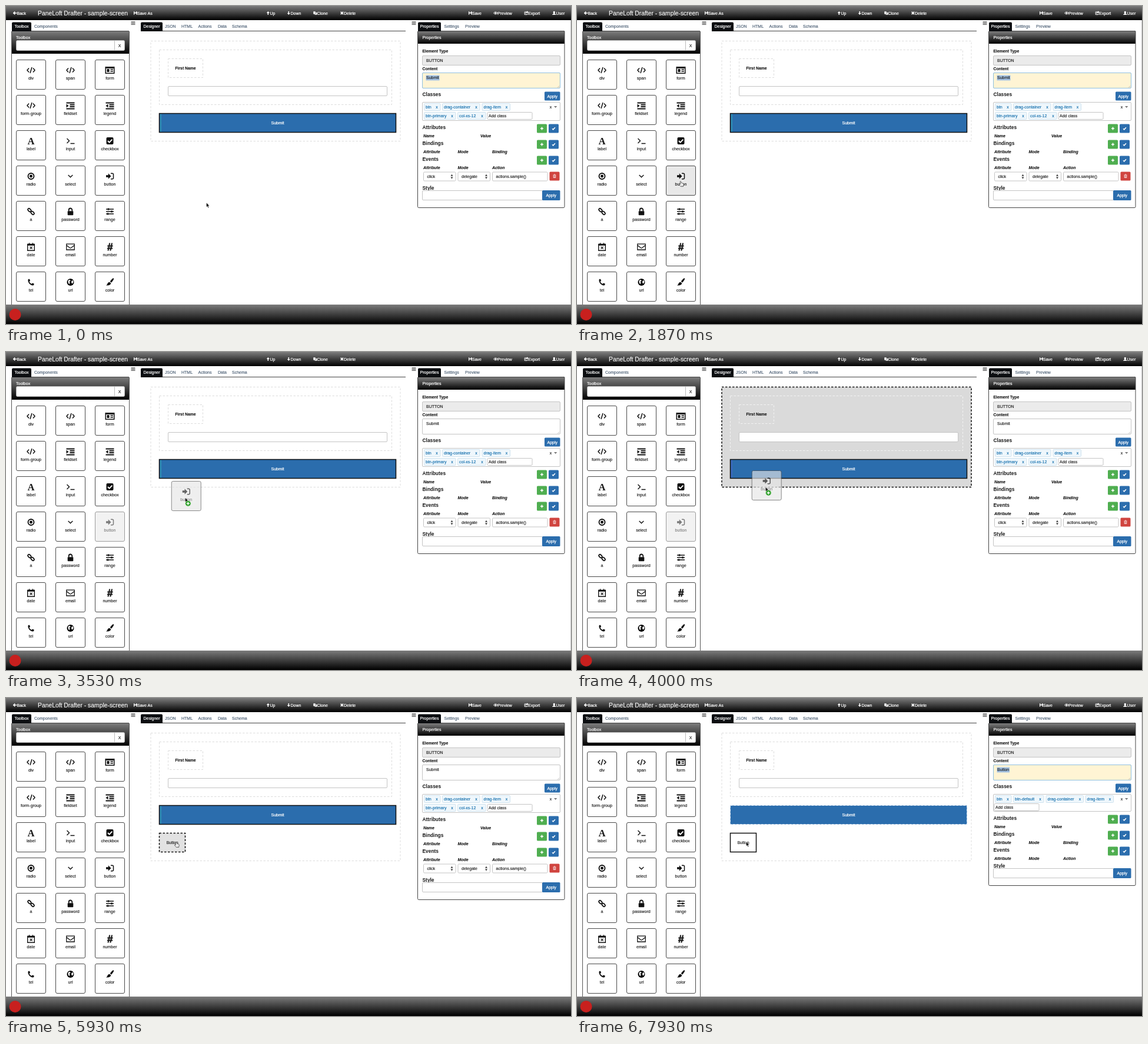
Recreate the animation shown at these times as an HTML page. Size 960 by 540 pixels, loop 8000 ms.

```html
<!DOCTYPE html>
<html lang="en">
<head>
<meta charset="utf-8">
<title>Screen designer</title>
<style>
html, body { margin: 0; width: 100%; height: 100%; overflow: hidden; background: #fff; }
svg { display: block; width: 100vw; height: 100vh; }
text {
  font: 7px "Liberation Sans", Arial, sans-serif; white-space: pre;
  color: #1a1a1a; fill: currentColor; stroke: currentColor; stroke-width: .14;
}
.mid { text-anchor: middle; }
.label { font-size: 7.15px; }
.white { color: #fff; }
.bar { color: #fff; stroke-width: .22; }
.title { font-size: 10.35px; color: #fff; }
.link { color: #465a70; }
.bold { font-weight: bold; font-size: 6.8px; }
.head { font-weight: bold; font-size: 8.4px; stroke-width: 0; }
.col { font-weight: bold; font-style: italic; font-size: 6.9px; }
.tag { color: #0f6cab; }
.glyph { font: bold 16px "Liberation Serif", serif; }
.hash { font: italic bold 17px "Liberation Sans", sans-serif; stroke-width: .8; }
.faint { fill: none; stroke: #ddd; stroke-dasharray: 3.5 2.5; }
</style>
</head>
<body>
<svg id="stage" viewBox="0 0 960 540" preserveAspectRatio="none"></svg>
<script>
const BLUE = '#2b6dad', GREEN = '#4fae50', RED = '#d0443f', DASH = '3.5 2.5';

const text = (x, y, s, cls = '') => `<text x="${x}" y="${y}" class="${cls}">${s}</text>`;
const rect = (x, y, w, h, fill = '#fff', stroke = 'none', r = 0, more = '') =>
  `<rect x="${x}" y="${y}" width="${w}" height="${h}" rx="${r}" fill="${fill}" stroke="${stroke}" ${more}/>`;
const fill = (d, c = '#111') => `<path d="${d}" fill="${c}" fill-rule="evenodd"/>`;
const line = (d, c = '#111', w = 1.6) => `<path d="${d}" fill="none" stroke="${c}" stroke-width="${w}"/>`;
const at = (x, y, body, more = '') => `<g transform="translate(${x} ${y})" ${more}>${body}</g>`;
const group = (id, body) => `<g id="${id}">${body}</g>`;
const field = (x, y, w, h, c = '#fff') => rect(x, y, w, h, c, '#c4c4c4', 1.5);

const listBars = 'M-7-5.5h14v2h-14zM-1-2.2h8v2h-8zM-1 1.1h8v2h-8zM-7 4.4h14v2h-14z';
const code = line('M-3.5-3.5L-6.5 0l3 3.5M3.5-3.5L6.5 0l-3 3.5M1.5-5L-1.5 5', '#111', 1.5);
const icons = {
  div: code,
  span: code,
  form: fill('M-8-6H8V6H-8zM-6.5-3h13v7.5h-13zM-5-2h4v5h-4zM1-2h4.5v1.5H1zM1 1h4.5v1.5H1z'),
  'form-group': code,
  fieldset: fill(listBars + 'M-7-2.4l4 2.9-4 2.9z'),
  legend: fill(listBars + 'M-3-2.4l-4 2.9 4 2.9z'),
  label: text(0, 6, 'A', 'glyph mid'),
  input: line('M-6-4l4 4-4 4M0 4.5h7', '#111', 1.4),
  checkbox: rect(-6, -6, 12, 12, '#111', 'none', 2) + line('M-3.5 0l2.6 2.6L3.8-2.4', '#fff', 2),
  radio: '<circle r="5" fill="none" stroke="#111" stroke-width="1.9"/><circle r="2.4"/>',
  select: line('M-3.8-2l3.8 3.8L3.8-2', '#111', 1.4),
  button: line('M1.5-4.8h2.5q2 0 2 2v5.6q0 2-2 2h-2.5', '#111', 1.5) +
    fill('M-6.5-1.8h3.8v-3L2 0l-4.7 4.8v-3h-3.8z'),
  a: ['-2.6 -2.4', '2.6 2.4'].map(p => `<rect x="-3.2" y="-2" width="6.4" height="4" rx="2"
    transform="translate(${p}) rotate(45)" fill="none" stroke="#111" stroke-width="1.8"/>`).join(''),
  password: rect(-4.8, -.8, 9.6, 7, '#111', 'none', 1) + line('M-2.8-.5v-2.2a2.8 2.8 0 0 1 5.6 0v2.2', '#111', 1.8),
  range: line('M-6.5-4h13M-6.5 0h13M-6.5 4h13', '#111', 1.3) +
    line('M-2.5-5.6v3.2M3-1.6v3.2M-3.5 2.4v3.2', '#111', 2.6),
  date: line('M-5.8-4.5H5.8V6.3H-5.8zM-5.8-3H5.8M-3-6.8v3M3-6.8v3', '#111', 1.4) +
    line('M-1.9-.4l4 4m0-4l-4 4', '#111', 1.2),
  email: line('M-6.7-4.8H6.7V5H-6.7zM-6.5-2.5L-1 1.8q1 .7 2 0L6.5-2.5', '#111', 1.3),
  number: text(0, 6, '#', 'hash mid'),
  tel: fill('M-5-4.5q1.5-1.6 2.6-.6l1 2.6-1.6 1.4q1 2.6 3.8 4l1.6-1.5 2.7 1.2q.6 1.7-1.2 2.8C-.5 6.5-6 .5-5-4.5z'),
  url: '<circle r="6"/>' + fill('M-4-3l3-1.2 1.2 1.5-2 1.7L-1 .8l-1 3L-3.8 1zM2-2.5l2.5-.5.5 3-2 2.8L1.5.5z', '#fff'),
  color: fill('M6.5-6.5q1.4 1-4 7.3l-2.3-2Q5-7.5 6.5-6.5zM-.6-.3L1.8 1.8Q1 6.2-6.5 5.4q2-.9 2.3-3 1-2.7 3.6-2.7z')
};

const mark = {
  back: line('M3 0H-2.4M0-2.6L-2.6 0 0 2.6', '#fff', 1.4),
  save: fill('M-2.8-2.8h5l.8.8v4.8h-5.8zM-1.4-2.8h2.4v1.8h-2.4zM-1.6.6h3.2v2.2h-3.2z', '#fff'),
  up: fill('M0-3L2.6 0H.8v3H-.8V0h-1.8z', '#fff'),
  down: fill('M0 3L2.6 0H.8v-3H-.8v3h-1.8z', '#fff'),
  clone: fill('M-3-2.8H.4v4.6H-3zM1-1.2h2V3H-.9v-.7H1z', '#fff'),
  remove: line('M-2.1-2.1l4.2 4.2m0-4.2l-4.2 4.2', '#fff', 1.7),
  view: line('M-3.2 0Q0-4 3.2 0 0 4-3.2 0z', '#fff', 1) + '<circle r="1.2" fill="#fff"/>',
  share: line('M1-2h-3.6v4.6h4.6V1', '#fff', 1) + line('M-1 1q0-2.6 3.6-2.8M1.2-3L3-1.6 1.2 0', '#fff', 1.1),
  user: fill('M-1.7-1.4a1.7 1.8 0 0 1 3.4 0Q1.5.5.8.9L3 2v1h-6V2l2.2-1.1q-.7-.4-.9-2.3z', '#fff'),
  plus: line('M-2.5 0h5M0-2.5v5', '#fff', 1.5),
  check: line('M-2.4.2l1.6 1.6L2.5-1.7', '#fff', 1.5),
  trash: line('M-2.5-2h5M-1-3h2M-1.8-1.5v4h3.6v-4M0-1v3', '#fff', .8)
};

const shade = (x, y, w, h) => rect(x, y, w, h, 'url(#shade)');
const menu = (icon, x, label) => at(x - 3.2, 12, mark[icon]) + text(x, 14.6, label, 'bar');
const burger = x => line(`M${x} 26.8h7m-7 2.3h7m-7 2.3h7`, '#555', 1.2);

function tabs(x, right, w, active, others) {
  return line(`M${x} 42.5H${right}`, '#444', 1) +
    fill(`M${x} 43V29.5q0-2 2-2h${w - 4}q2 0 2 2V43z`, '#0c0e11') +
    text(x + w / 2, 37.4, active, 'bar mid') +
    others.map(([tx, s]) => text(tx, 37.4, s, 'link')).join('');
}

const cellFace = (name, bg = '#fff') => rect(.5, .5, 50, 50, bg, '#4a4a4a', 2.5) +
  at(25.5, 18, icons[name]) + text(25.5, 33.6, name, 'label mid');
const names = Object.keys(icons);
const cells = names.map((name, i) => ({ name, x: 17 + i % 3 * 67, y: 91 + Math.floor(i / 3) * 60 }));

const toolbox = () =>
  line('M9.5 43V508M209.5 43V508', '#555', 1) + shade(10, 43, 199, 38) +
  tabs(10, 209, 33, 'Toolbox', [[48, 'Components']]) +
  text(17, 56, 'Toolbox', 'bar') +
  rect(17.5, 58.5, 184, 17, '#fff', '#bbb', 2) + line('M184.5 59v16', '#bbb', 1) +
  text(193, 69.5, 'X', 'mid') +
  cells.map(c => at(c.x, c.y, cellFace(c.name), `id="cell-${c.name}"`)).join('');

const designer = () =>
  tabs(229, 679, 37, 'Designer',
    [[270, 'JSON'], [298, 'HTML'], [326.5, 'Actions'], [360, 'Data'], [384, 'Schema']]) +
  `<rect id="area" x="246" y="59.5" width="424" stroke-dasharray="${DASH}"/>` +
  '<rect class="faint" x="260.5" y="74.5" width="395" height="93"/>' +
  '<rect class="faint" x="275.5" y="89.5" width="59" height="32"/>' +
  text(305, 108, 'First Name', 'bold mid') + field(275.5, 136.5, 372, 16) +
  rect(260.5, 182.5, 402, 32, BLUE) +
  group('submitOn', rect(260.5, 182.5, 402, 32, 'none', '#111', 0, 'stroke-width="1.5"') +
    '<path id="strip" d="M263 184v29" stroke-width="1.6" stroke-dasharray="1 1"/>') +
  group('submitOff', rect(260.5, 182.5, 402, 32, 'none', '#dce8f4', 0, `stroke-dasharray="${DASH}"`)) +
  text(461.5, 201, 'Submit', 'bar mid label') +
  group('added', '<rect id="addedBox" x="260.5" y="229.5" width="44" height="32"/>' +
    text(282.5, 248, 'Button', 'mid'));

const square = (x, y, color, icon) => rect(x, y, 17, 15, color, 'none', 1.5) + at(x + 8.5, y + 7.5, mark[icon]);
const apply = (x, y, w, h) => rect(x, y, w, h, BLUE, 'none', 1.5) +
  text(x + w / 2, y + h / 2 + 2.6, 'Apply', 'bar mid');
const tag = (x, y, right, s) => rect(x, y, right - x, 12, '#eff7fc', '#cfe2ee', 1) +
  text(x + 2.5, y + 8.5, s, 'tag') + text(right - 6, y + 8.3, 'x', 'tag mid');
const section = (y, s, cols) => text(707.5, y, s, 'head') +
  square(902, y - 8, GREEN, 'plus') + square(922, y - 8, BLUE, 'check') +
  cols.map(([x, c]) => text(x, y + 14.3, c, 'col')).join('');
const picker = (x, w, s) => field(x, 282, w, 15) + text(x + 6, 292.4, s) +
  fill(`M${x + w - 8.5} 288.8l2-3 2 3zm0 1.8h4l-2 3z`, '#333');

function properties(id, content, selWidth, tags, add, lift, eventRow, styleY) {
  const y = 208.5 - lift;
  return group(id,
    line(`M699.5 43V${styleY + 29}q0 2 2 2h245.5q2 0 2-2V43`, '#444', 1) +
    text(707.5, 79, 'Element Type', 'bold') + field(707.5, 84.5, 234, 16, '#ebebeb') + text(714, 95, 'BUTTON') +
    text(707.5, 108.6, 'Content', 'bold') + field(707.5, 113.5, 234, 26) +
    group(id + 'Focus', rect(707.5, 113.5, 234, 26, '#fff4d4', '#8fc0df', 1.5) +
      rect(713.5, 117.5, selWidth, 9, '#a5c3e4')) +
    text(714, 124.3, content) + line('M937 138.5l3-3m-1.2 3l1.2-1.2', '#888', .5) +
    text(707.5, 153.3, 'Classes', 'head') + apply(915, 145.5, 26.5, 15) +
    field(707.5, 163.5, 234, 31 - lift) + tags.map(a => tag(...a)).join('') +
    text(925.5, 174, 'x', 'mid') + fill('M931 170h5.4l-2.7 3z', '#777') +
    field(add[0], add[1], 76, 12) + text(add[0] + 2, add[1] + 8.6, 'Add class') +
    section(y, 'Attributes', [[709, 'Name'], [806, 'Value']]) +
    section(y + 27, 'Bindings', [[709, 'Attribute'], [767.5, 'Mode'], [826, 'Binding']]) +
    section(y + 54, 'Events', [[709, 'Attribute'], [767.5, 'Mode'], [826, 'Action']]) + eventRow +
    text(707.5, styleY, 'Style', 'head') + field(707.5, styleY + 2, 204, 16) +
    apply(911, styleY + 1.5, 30.5, 17));
}

const eventRow = picker(709.5, 54.5, 'click') + picker(768, 54.5, 'delegate') +
  field(826.5, 282, 93.5, 15) + text(832.5, 292.4, 'actions.sample()') + square(923.5, 281.5, RED, 'trash');

const el = {};
const stage = document.getElementById('stage');
stage.innerHTML =
  '<defs><linearGradient id="shade" x2="0" y2="1"><stop stop-color="#7c7c7c"/><stop offset="1"/></linearGradient></defs>' +
  rect(0, 0, 960, 540) + line('M959.5 24V507', '#ccc', 1) + shade(0, 0, 960, 24) +
  menu('back', 18.5, 'Back') + text(54, 15.6, 'PaneLoft Drafter - sample-screen', 'title') +
  menu('save', 223, 'Save As') + menu('up', 448.5, 'Up') + menu('down', 483.5, 'Down') +
  menu('clone', 528.5, 'Clone') + menu('remove', 574, 'Delete') + menu('save', 792, 'Save') +
  menu('view', 835, 'Preview') + menu('share', 887, 'Export') + menu('user', 934.5, 'User') +
  burger(212.5) + burger(689.5) + toolbox() + designer() +
  shade(700, 43, 249, 21) + tabs(700, 949, 39, 'Properties', [[744.5, 'Settings'], [780, 'Preview']]) +
  text(707.5, 56, 'Properties', 'bar') +
  properties('before', 'Submit', 23, [[710.5, 165.5, 738, 'btn'], [741.5, 165.5, 805, 'drag-container'],
    [809, 165.5, 856.5, 'drag-item'], [710.5, 180.5, 764, 'btn-primary'], [767.5, 180.5, 815, 'col-xs-12']],
    [818, 180.5], 0, eventRow, 311.5) +
  properties('after', 'Button', 21.5, [[710.5, 165.5, 738, 'btn'], [741.5, 165.5, 793, 'btn-default'],
    [797, 165.5, 860.5, 'drag-container'], [864, 165.5, 911.5, 'drag-item']],
    [709, 179.5], 2, '', 287.5) +
  shade(0, 507, 960, 33) + '<circle cx="15.5" cy="524" r="10" fill="#c8201e"/>' +
  group('ghost', `<g opacity=".65">${cellFace('button', '#e6e6e6')}</g>` +
    rect(8, 26, 35, 11, '#eee', 'none', 0, 'opacity=".25"')) +
  group('arrow', '<path d="M0 0v7.6l1.7-1.5 1.2 2.7 1.3-.6-1.2-2.6h2.3z" fill="#000" stroke="#fff" stroke-width=".5"/>') +
  group('hand', `<path d="M-.4.8q.9-1.2 1.7 0l.5 2.3 3 .6q1 .4.9 1.7L5 9H.9l-3-3.3q-.3-1 .9-.9l1.2.8z"
    fill="#fff" stroke="#222" stroke-width=".7"/>` + line('M2 6.2v1.5m1.5-1.5v1.5', '#555', .5)) +
  group('copy', '<circle cx="4.8" cy="9.8" r="4.7" fill="#2fa02b" stroke="#d8f0d4" stroke-width=".6"/>' +
    at(4.8, 9.8, mark.plus));
stage.querySelectorAll('[id]').forEach(n => el[n.id] = n);
const faint = stage.querySelectorAll('.faint');

const LOOP = 8000, STEP = 1000 / 15;
const path = [
  [467, 340.5, 334], [1333, 235, 347], [1867, 175.5, 297.5], [2533, 175.5, 299], [2733, 187, 297.5],
  [3400, 297, 255.5], [3533, 304.5, 247.5], [4000, 320.5, 229.4], [4267, 320, 227.5],
  [4333, 326.5, 225.5], [5533, 326.5, 225.5], [5933, 288.5, 244.5], [7867, 287.5, 244]
];

function pointer(t) {
  const i = path.findIndex(k => k[0] >= t);
  if (i < 0) return path[path.length - 1].slice(1);
  if (i === 0) return path[0].slice(1);
  const [t0, x0, y0] = path[i - 1], [t1, x1, y1] = path[i];
  let p = (t - t0) / (t1 - t0);
  if (i === 1) p = p * p * (3 - 2 * p);
  return [x0 + (x1 - x0) * p, y0 + (y1 - y0) * p];
}

const show = (node, on) => node.setAttribute('visibility', on ? 'visible' : 'hidden');
const move = (node, x, y) => node.setAttribute('transform', `translate(${x} ${y})`);
const set = (node, attrs) => Object.entries(attrs).forEach(([k, v]) => node.setAttribute(k, v));
const clamp = v => Math.max(0, Math.min(1, v));

function draw(now) {
  const t = Math.floor((now % LOOP + 5) / STEP) * STEP + 1;
  const [x, y] = pointer(t);
  const inside = (l, top, w, h) => x >= l && x <= l + w && y >= top && y <= top + h;
  const dragging = t > 2600 && t < 4733;
  const dropped = t > 4733, selected = t > 6266;
  const overAdded = dropped && inside(261, 229, 43, 33);
  const lit = t > 3530 && !overAdded && inside(246, 59, 424, dropped ? 217 : 170.5);

  let overCell = false;
  for (const c of cells) {
    const over = !dragging && t < 2700 && inside(c.x, c.y, 50, 50);
    const taken = c.name === 'button' && t > 2600 && t < 4799;
    overCell = overCell || over;
    const node = el['cell-' + c.name];
    node.firstChild.setAttribute('fill', over || taken ? '#e8e8e8' : '#fff');
    node.setAttribute('opacity', !taken ? 1 : t < 3000 ? .45 : .55);
  }

  set(el.area, { height: dropped ? 217 : 170, fill: lit ? '#dadada' : 'none',
    stroke: lit ? '#111' : '#ddd', 'stroke-width': lit ? 1.5 : 1 });
  faint.forEach(n => n.style.stroke = lit ? '#f2f2f2' : '#ddd');
  el.strip.setAttribute('stroke', lit ? '#5b62e0' : '#35c9c0');
  show(el.submitOn, !selected);
  show(el.submitOff, selected);

  show(el.added, dropped);
  set(el.addedBox, {
    fill: overAdded && !selected ? '#e2e2e2' : '#fff',
    stroke: overAdded || selected ? '#111' : '#ccc',
    'stroke-width': overAdded || selected ? 1.5 : 1,
    'stroke-dasharray': selected ? 'none' : DASH
  });

  show(el.before, !selected);
  show(el.after, selected);
  el.beforeFocus.setAttribute('opacity', 1 - clamp((t - 2200) / 200));
  el.afterFocus.setAttribute('opacity', clamp((t - 6200) / 333));

  const hand = overCell || overAdded && t < 7930;
  show(el.hand, hand);
  show(el.arrow, !hand);
  show(el.ghost, dragging);
  show(el.copy, dragging);
  move(el.ghost, x - 23.8, y - 28.4);
  for (const id of ['hand', 'arrow', 'copy']) move(el[id], x, y);
}

function tick() {
  draw(performance.now());
  requestAnimationFrame(tick);
}
tick();
</script>
</body>
</html>
```
